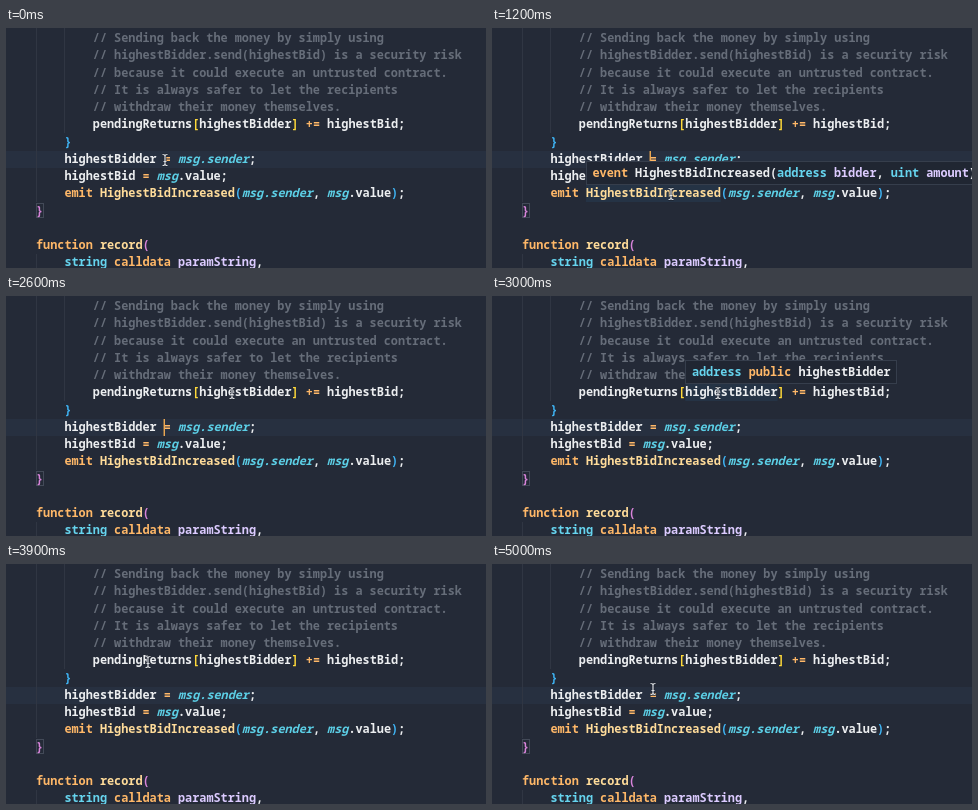
These frames come from a looping animation (480x240 px, 5100 ms). An HTML page with a canvas:

```html
<!DOCTYPE html>
<html lang="en">
<head>
<meta charset="utf-8">
<title>Hover hints in a code editor</title>
<style>
  html, body { margin: 0; width: 100%; height: 100%; overflow: hidden; background: #242936; }
  canvas { display: block; width: 480px; height: 240px; }
</style>
</head>
<body>
<canvas id="stage"></canvas>
<script>
const W = 480, H = 240, LOOP = 5100, TICK = 100;
const CHAR = 7.1, LINE = 17.25, LEFT = 30, BASE = 14.1;
const SIZE = CHAR / 0.6;
const FAMILY = '"Noto Sans Mono", "DejaVu Sans Mono", monospace';

const BG = '#242a37', ROW = '#273040', HOVER = '#253345', EDGE = '#363e4c';
const HINT_BG = '#202632', GUIDE = '#303643';
const INK = {
  w: '#eceef0', c: '#666d79', o: '#ffb868', f: '#ffdc9a', t: '#66d4ee',
  i: '#5ccfe6', y: '#ffd93a', b: '#3fb4f4', p: '#d884da', v: '#dccbff'
};

// Each line is [indent, ...tokens]; a token's first letter selects its ink.
const CODE = [
  [8, 'c// Sending back the money by simply using'],
  [8, 'c// highestBidder.send(highestBid) is a security risk'],
  [8, 'c// because it could execute an untrusted contract.'],
  [8, 'c// It is always safer to let the recipients'],
  [8, 'c// withdraw their money themselves.'],
  [8, 'wpendingReturns', 'y[', 'whighestBidder', 'y]', 'o += ', 'whighestBid;'],
  [4, 'b}'],
  [4, 'whighestBidder ', 'o= ', 'imsg.sender', 'w;'],
  [4, 'whighestBid ', 'o= ', 'imsg', 'w.value;'],
  [4, 'oemit ', 'fHighestBidIncreased', 'b(', 'imsg.sender', 'w, ', 'imsg', 'w.value', 'b)', 'w;'],
  [0, 'p}'],
  [0],
  [0, 'ofunction ', 'frecord', 'p('],
  [4, 'tstring ', 'ocalldata ', 'vparamString', 'w,']
];

const HINTS = [
  { from: 900, to: 2300, line: 9, col: 9, len: 19,
    text: ['oevent ', 'wHighestBidIncreased(', 'taddress ', 'vbidder', 'w, ', 'tuint ', 'vamount', 'w)'] },
  { from: 2800, to: 3700, line: 5, col: 23, len: 13,
    text: ['taddress ', 'opublic ', 'whighestBidder'] },
  { from: 4000, to: 4500, line: 5, col: 8, len: 14,
    text: ['omapping', 'w(', 'taddress ', 'o=> ', 'tuint', 'w) pendingReturns'] }
];

// Pointer path: time, x, y
const PATH = [
  [0, 159, 132], [300, 159, 132], [800, 179, 166], [1700, 179, 166],
  [2100, 212, 119], [2500, 226, 97], [3100, 226, 97], [3500, 178, 97],
  [3800, 142, 98], [4300, 142, 98], [4800, 160, 123], [5000, 161, 125],
  [5100, 159, 132]
];

const canvas = document.getElementById('stage');
const ctx = canvas.getContext('2d');
const scale = window.devicePixelRatio || 1;
canvas.width = W * scale;
canvas.height = H * scale;

const colX = col => LEFT + col * CHAR;
const rowTop = line => Math.round(BASE + line * LINE - 12.2);

function box(color, x, y, w, h) {
  ctx.fillStyle = color;
  ctx.fillRect(x, y, w, h);
}

function frame(color, x, y, w, h) {
  ctx.strokeStyle = color;
  ctx.lineWidth = 1;
  ctx.strokeRect(Math.round(x) + 0.5, y + 0.5, Math.round(w) - 1, h - 1);
}

function write(tokens, x, y) {
  for (const token of tokens) {
    const ink = token[0], text = token.slice(1);
    ctx.font = `${ink === 'i' ? 'italic ' : ''}700 ${SIZE}px ${FAMILY}`;
    ctx.fillStyle = INK[ink];
    ctx.fillText(text, x, y);
    x += text.length * CHAR;
  }
}

function drawHint({ line, col, text }) {
  const chars = text.reduce((sum, token) => sum + token.length - 1, 0);
  const x = colX(col), y = rowTop(line) - 24, w = chars * CHAR + 13;
  box(HINT_BG, x, y, w, 24);
  frame(EDGE, x, y, w, 24);
  write(text, x + 6.6, y + 16);
}

function pointerAt(t) {
  const k = PATH.findIndex(p => p[0] > t);
  const [t0, x0, y0] = PATH[k - 1], [t1, x1, y1] = PATH[k];
  const u = (t - t0) / (t1 - t0), e = u * u * (3 - 2 * u);
  return [x0 + (x1 - x0) * e, y0 + (y1 - y0) * e];
}

function drawPointer(x, y) {
  ctx.beginPath();
  ctx.moveTo(x - 2.5, y - 5.5);
  ctx.quadraticCurveTo(x, y - 5.5, x, y - 4);
  ctx.quadraticCurveTo(x, y - 5.5, x + 2.5, y - 5.5);
  ctx.moveTo(x, y - 4);
  ctx.lineTo(x, y + 4);
  ctx.moveTo(x - 2.5, y + 5.5);
  ctx.quadraticCurveTo(x, y + 5.5, x, y + 4);
  ctx.quadraticCurveTo(x, y + 5.5, x + 2.5, y + 5.5);
  ctx.moveTo(x - 1.5, y + 1.5);
  ctx.lineTo(x + 1.5, y + 1.5);
  for (const [color, width] of [['#1b202b', 2.6], ['#dde0e4', 1.2]]) {
    ctx.strokeStyle = color;
    ctx.lineWidth = width;
    ctx.stroke();
  }
}

function draw(t) {
  ctx.setTransform(scale, 0, 0, scale, 0, 0);
  box(BG, 0, 0, W, H);
  box(ROW, 0, rowTop(7), W, 17);
  box(GUIDE, 30, 0, 1, rowTop(10));
  box(GUIDE, 58, 0, 1, rowTop(6));
  box(GUIDE, 30, rowTop(13), 1, 17);

  const hint = HINTS.find(h => t >= h.from && t < h.to);
  if (hint) box(HOVER, colX(hint.col), rowTop(hint.line), hint.len * CHAR, 17);

  frame('#434a58', 30, rowTop(10) + 1, 8, 15);
  CODE.forEach(([indent, ...tokens], i) => write(tokens, colX(indent), BASE + i * LINE));

  const blink = t % 1000;
  if (blink >= 200 && blink < 700) box('#ffb454', 157.6, rowTop(7), 1.3, 17);

  if (hint) drawHint(hint);
  drawPointer(...pointerAt(t));
}

const start = performance.now();
function tick() {
  const t = (performance.now() - start) % LOOP;
  draw(Math.floor(t / TICK) * TICK);
  requestAnimationFrame(tick);
}
tick();
</script>
</body>
</html>
```
